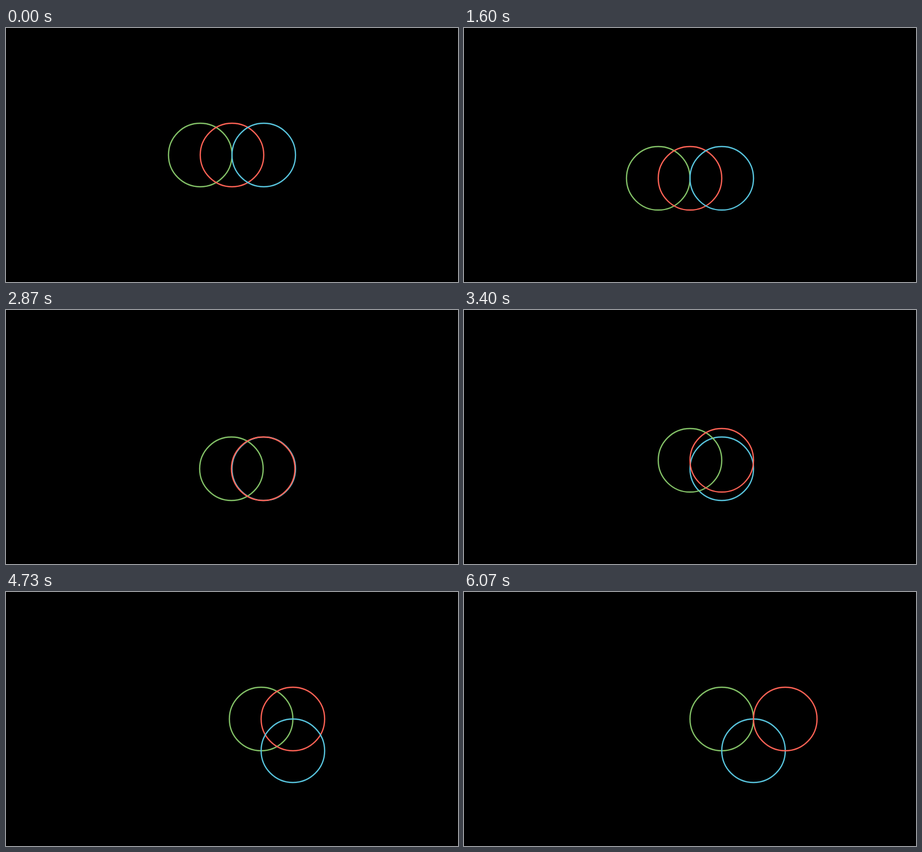
These frames come from a looping animation (854x480 px, 6990 ms). An HTML page with a canvas:

```html
<!DOCTYPE html>
<html lang="en">
<head>
<meta charset="utf-8">
<title>Three circles</title>
<style>
  html, body { margin: 0; width: 100%; height: 100%; overflow: hidden; background: #000; }
  canvas { display: block; }
</style>
</head>
<body>
<canvas id="stage" width="854" height="480"></canvas>
<script>
const ctx = document.getElementById('stage').getContext('2d');
const LOOP = 6990, FPS = 15, UNIT = 60;

const circles = {
  g: { color: '#83C167', x: -1 },
  r: { color: '#FC6255', x: 0 },
  b: { color: '#58C4DD', x: 1 }
};

// One-second moves from t = 1 s; order lists the circles back to front.
const moves = [
  { who: 'grb', dx: 0, dy: 1, order: 'grb' },
  { who: 'gr', dx: 1, dy: 0, order: 'bgr' },
  { who: 'gr', dx: 0, dy: -1, order: 'bgr' },
  { who: 'grb', dx: 1, dy: 0, order: 'grb' },
  { who: 'r', dx: 1, dy: 0, order: 'gbr' }
];

const sigmoid = x => 1 / (1 + Math.exp(-x));

function smooth(t) {
  const edge = sigmoid(-5);
  const s = (sigmoid(10 * (t - 0.5)) - edge) / (1 - 2 * edge);
  return Math.min(1, Math.max(0, s));
}

function draw(ms) {
  const step = Math.floor((ms + 3.5) * FPS / 1000);
  const sec = step / FPS;
  const current = Math.min(moves.length - 1, Math.max(0, Math.floor(step / FPS) - 1));

  ctx.fillStyle = '#000';
  ctx.fillRect(0, 0, 854, 480);
  ctx.lineWidth = 2.4;

  for (const id of moves[current].order) {
    let { color, x } = circles[id], y = 0;
    moves.forEach((m, i) => {
      if (!m.who.includes(id)) return;
      const k = smooth(Math.min(1, Math.max(0, sec - 1 - i)));
      x += m.dx * k;
      y += m.dy * k;
    });
    ctx.strokeStyle = color;
    ctx.beginPath();
    ctx.arc(427 + x * UNIT, 240 + y * UNIT, UNIT, 0, 2 * Math.PI);
    ctx.stroke();
  }
}

const start = performance.now();

function tick() {
  draw((performance.now() - start) % LOOP);
  requestAnimationFrame(tick);
}
tick();
</script>
</body>
</html>
```
